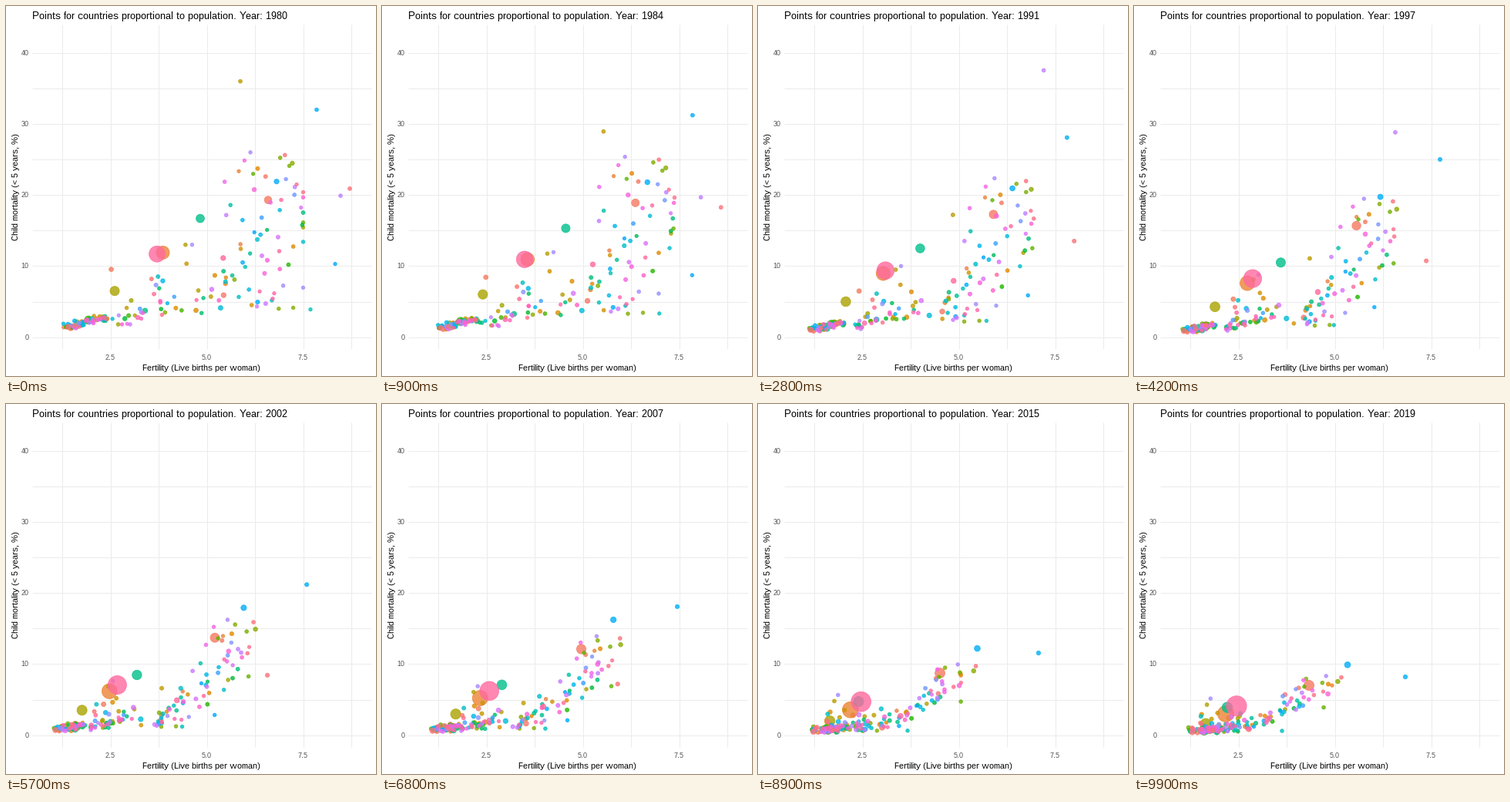
Write a matplotlib script that moves like this. It is 480 px wide and 480 px high and loops after 10000 ms.

```python
import matplotlib.pyplot as plt
import numpy as np
from matplotlib.animation import FuncAnimation

plt.rcParams.update({"font.family": "Liberation Sans",
                     "text.hinting": "native", "text.hinting_factor": 1})

STAGE, DPI, FRAMES = 480, 72, 100
LEFT, RIGHT, TOP, BOTTOM = 34, 474, 24, 445
MAX_POP = 7700
t = np.linspace(0, 1, FRAMES)
rng = np.random.default_rng(12)


def px(fert):
    return 10.5 + 50 * fert


def py(mort):
    return 429.6 - 9.22 * mort


def hcl(hue, chroma=100, light=65):
    """Polar LUV colour as clipped sRGB."""
    a = np.radians(hue)
    y = ((light + 16) / 116) ** 3
    u = chroma * np.cos(a) / (13 * light) + 0.1978
    v = chroma * np.sin(a) / (13 * light) + 0.4683
    x = 9 * y * u / (4 * v)
    z = y * (12 - 3 * u - 20 * v) / (4 * v)
    rgb = np.array([3.2406 * x - 1.5372 * y - 0.4986 * z,
                    -0.9689 * x + 1.8758 * y + 0.0415 * z,
                    0.0557 * x - 0.2040 * y + 1.0570 * z])
    rgb = np.clip(rgb, 0, 1)
    return np.where(rgb > 0.0031308, 1.055 * rgb ** (1 / 2.4) - 0.055, 12.92 * rgb)


def ease(p):
    """Early change for p > 1, late change for p < 1."""
    return 1 - (1 - t) ** p if p >= 1 else t ** (1 / p)


def lerp(a, b, s):
    return a + (b - a) * s


dots = []


def add(hue, pop, growth, fert, mort):
    dots.append((hue, lerp(pop, pop * growth, t), px(fert), py(mort)))


def glide(hue, pop, growth, start, end, pace, shock=0):
    """Point eased between two (fertility, mortality) pairs."""
    fert, mort = (lerp(a, b, ease(p)) for a, b, p in zip(start, end, pace))
    add(hue, pop, growth, fert, mort + shock * np.exp(-((t - 0.33) / 0.14) ** 2))


def drift(fert, mort):
    """Country of the crowd with random colour and population."""
    add(rng.uniform(15, 375), min(rng.lognormal(1.6, 1.4), 150), 1.5, fert, mort)


# Continents and giants
glide(354, 4440, 1.74, (3.71, 11.7), (2.45, 4.1), (2, 1.1))
glide(32, 2640, 1.74, (3.86, 11.9), (2.17, 3.0), (2, 1.2))
glide(19, 480, 2.7, (6.59, 19.3), (4.33, 7.0), (1.1, 0.7))
glide(83, 1000, 1.43, (2.61, 6.5), (1.65, 1.6), (2.5, 1.1))
glide(165, 700, 1.95, (4.83, 16.7), (2.21, 3.9), (1.15, 1.2))
glide(124, 690, 1.08, (1.93, 2.4), (1.61, 0.6), (4, 1.2))
glide(234, 73, 2.74, (6.81, 21.9), (5.33, 9.9), (1, 0.5))

# Countries at the rim of the cloud
glide(231, 6, 3.9, (7.85, 32), (6.83, 8.2), (0.4, 0.7))
glide(10, 8, 3.6, (8.71, 20.9), (3.71, 5.7), (0.65, 2))
glide(70, 7, 2.4, (5.87, 36), (2.53, 2.7), (1.1, 2.5))
glide(190, 1, 3, (7.69, 3.9), (3.63, 0.6), (2, 2))
glide(240, 1, 4, (8.33, 10.3), (2.9, 1.2), (1, 2))
glide(282, 5, 2.4, (8.47, 19.8), (3.99, 3.6), (1, 1), shock=25)

# The crowd: low, emerging and steeply falling
for u in rng.random(60):
    f0 = 1.4 + u ** 1.5 + 0.1 * rng.normal()
    f1 = rng.uniform(1.2, 2.0)
    m0 = 0.9 + 1.6 * u + 0.35 * abs(rng.normal())
    drift(lerp(f0, f1, t) - 0.28 * np.sin(np.pi * t), m0 * rng.uniform(0.25, 0.45) ** t)
for f0 in rng.uniform(2.3, 5.4, 48):
    m0 = np.clip((f0 - 1) * 1.5 * np.exp(0.5 * rng.normal()), 1.8, 13)
    drift(lerp(f0, rng.uniform(1.5, 2.5), ease(1.5)), m0 * rng.uniform(0.2, 0.4) ** t)
for u in np.linspace(0, 1, 70):
    f0 = np.clip(6.5 + 0.65 * rng.normal(), 5, 7.5)
    f1 = 2 + 2.9 * u + 0.4 * rng.normal()
    m0 = 4 + 22 * u ** 1.2
    drift(lerp(f0, f1, t ** (0.8 + 0.7 * u)), m0 * (0.12 + 0.2 * u) ** t ** (1 + 0.6 * u))

dots.sort(key=lambda d: d[0])
hues, pops, xs, ys = map(np.array, zip(*dots))
colors = [(*hcl(h), 0.8) for h in hues]
radii = 2.1 + 11 * np.sqrt(pops / MAX_POP)

fig = plt.figure(figsize=(STAGE / DPI, STAGE / DPI), dpi=DPI, facecolor="white")
ax = fig.add_axes([0, 0, 1, 1])
ax.set(xlim=(0, STAGE), ylim=(STAGE, 0))
ax.axis("off")

grid = dict(color="#EBEBEB", lw=1, solid_capstyle="butt", zorder=1)
for v in np.arange(0, 41, 5):
    ax.plot([LEFT, RIGHT], [py(v)] * 2, **grid)
for v in np.arange(1.25, 9, 1.25):
    ax.plot([px(v)] * 2, [TOP, BOTTOM], **grid)

tick = dict(fontsize=9, color="#4D4D4D")
for v in range(0, 41, 10):
    ax.text(29.5, py(v) + 3, str(v), ha="right", **tick)
for v in (2.5, 5.0, 7.5):
    ax.text(px(v), 459, f"{v:.1f}", ha="center", **tick)
ax.text(253.5, 473, "Fertility (Live births per woman)", ha="center", fontsize=11)
ax.text(16, 235, "Child mortality (< 5 years, %)", ha="center", va="baseline",
        rotation=90, rotation_mode="anchor", fontsize=11)
title = ax.text(34, 17, "", fontsize=13)

cloud = ax.scatter(xs[:, 0], ys[:, 0], facecolors=colors, edgecolors=colors,
                   linewidths=0.8, zorder=2)


def update(i):
    cloud.set_offsets(np.column_stack([xs[:, i], ys[:, i]]))
    cloud.set_sizes((2 * radii[:, i]) ** 2)
    title.set_text("Points for countries proportional to population. "
                   f"Year: {round(1980 + 39 * t[i])}")
    return cloud, title


anim = FuncAnimation(fig, update, frames=FRAMES, interval=100, repeat=True, repeat_delay=0)
plt.show()
```
